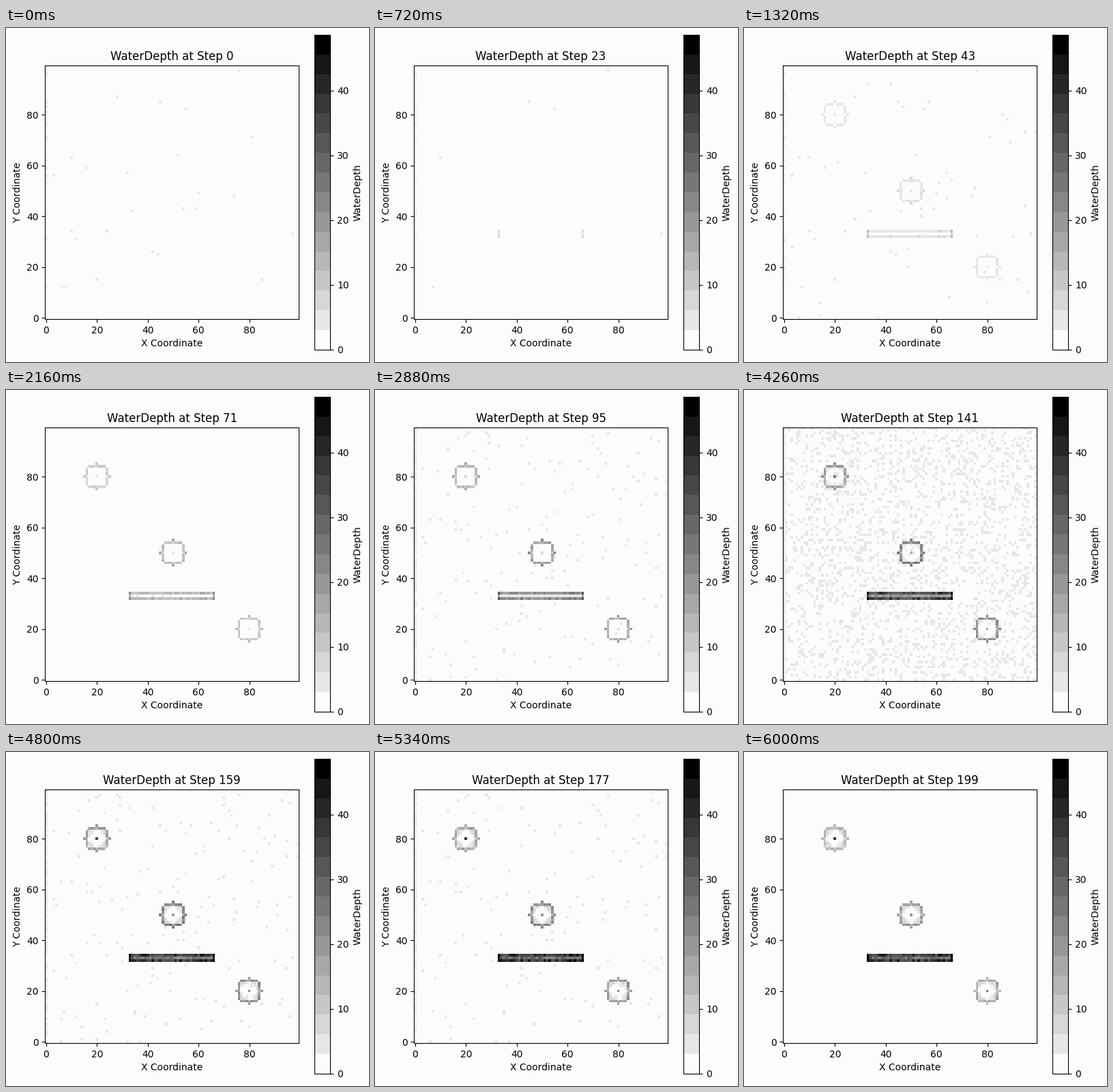
A matplotlib script that plays this animation: 532x490 px, repeating every 6060 ms.

```python
import numpy as np
import matplotlib.pyplot as plt
from matplotlib.animation import FuncAnimation
from matplotlib.colors import ListedColormap

W, H, DPI = 532, 490, 100
N, BANDS, VMAX = 100, 16, 48.6
FRAMES, INTERVAL = 101, 60
PAPER = "#fcfcfc"

plt.rcParams["font.family"] = "DejaVu Sans"
rng = np.random.default_rng(7)

# Showers: step of the peak and share of the ground wet at that step.
SHOWERS = [(11, .08), (53, .08), (87, .08), (125, .015),
           (141, .2), (165, .04), (181, .02)]
# Ponds: centre x, centre y, highest rim level, late gain in the middle.
PONDS = [(20, 80, 5.8, 8), (50, 50, 7.8, 2), (80, 20, 6.6, 3.5)]

# A cell is wet while its threshold lies below the wet share;
# the left edge drains last.
ground = rng.uniform(.0005, 1, (N, N))
ground[:, 0] *= .025
grain = rng.uniform(.8, 1.2, (N, N))


def wet_share(step):
    total = sum(p * np.exp(-((step - s) / 6.4) ** 2) for s, p in SHOWERS)
    return max(0, total - .0005)


def swell(step, peak, power):
    """Rise from 0 to 1 at the peak step, then sink slowly."""
    return np.sin(np.pi / 2 * step / peak) ** power


def surge(step):
    """The jump that follows the heaviest shower."""
    return 1 / (1 + np.exp((135 - step) / 9))


def fill_pond(bands, x, y, peak, gain, step):
    rim = peak * swell(step, 150, 1.8)
    tip = rim * np.interp(step, [71, 199], [1.35, .92])
    late = surge(step)
    for dx in range(-5, 6):
        for dy in range(-5, 6):
            a, b = abs(dx), abs(dy)
            if a * a + b * b > 25:
                continue
            cell = y + dy, x + dx
            if max(a, b) == 5:
                bands[cell] = tip
            elif max(a, b) == 4:
                bands[cell] = rim * grain[cell] * (.65 if min(a, b) == 0 else 1)
            elif a + b >= 4:
                bands[cell] = (2.4 if a + b > 4 else 1.2) * late * grain[cell]
    bands[y, x] = step / 40 + gain * late


def fill_bar(bands, step):
    span, ends = slice(33, 67), [33, 66]
    side = 13 * swell(step, 180, 2)
    mid = step / 80 + 7 * surge(step)
    end = step / 9
    for row in (32, 34):
        bands[row, span] = side * grain[row, span]
        bands[row, ends] = end
    bands[33, span] = mid * grain[33, span]
    bands[33, ends] = (mid + end) / 2


def depth(step):
    bands = np.where(ground < wet_share(step), 1.5, 0.0)
    for pond in PONDS:
        fill_pond(bands, *pond, step)
    fill_bar(bands, step)
    return np.clip(bands, 0, BANDS - .1) * VMAX / BANDS


def box(x, y, w, h):
    return [x / W, y / H, w / W, h / H]


greys = np.arange(BANDS)[::-1] * 16 + 7
greys[0], greys[-1] = 252, 0
cmap = ListedColormap(np.repeat(greys[:, None] / 255, 3, axis=1))

left, low = 57.12, 18.05
fig = plt.figure(figsize=(W / DPI, H / DPI), dpi=DPI, facecolor=PAPER)
ax = fig.add_axes(box(left, low + 45, 372, 372))
cax = fig.add_axes(box(left + 395.25, low, 23.1, 462))
im = ax.imshow(depth(0), cmap=cmap, vmin=0, vmax=VMAX, origin="lower",
               interpolation="nearest", aspect="auto")
ax.set_xticks(range(0, 100, 20))
ax.set_yticks(range(0, 100, 20))
ax.set_xlabel("X Coordinate")
ax.set_ylabel("Y Coordinate")
title = ax.set_title("WaterDepth at Step 0")
bar = fig.colorbar(im, cax=cax, label="WaterDepth")
bar.set_ticks(range(0, 50, 10))


def update(frame):
    step = max(0, 2 * frame - 1)
    im.set_data(depth(step))
    title.set_text(f"WaterDepth at Step {step}")
    return im, title


anim = FuncAnimation(fig, update, frames=FRAMES, interval=INTERVAL,
                     init_func=lambda: update(0), repeat=True, blit=False)
plt.show()
```
